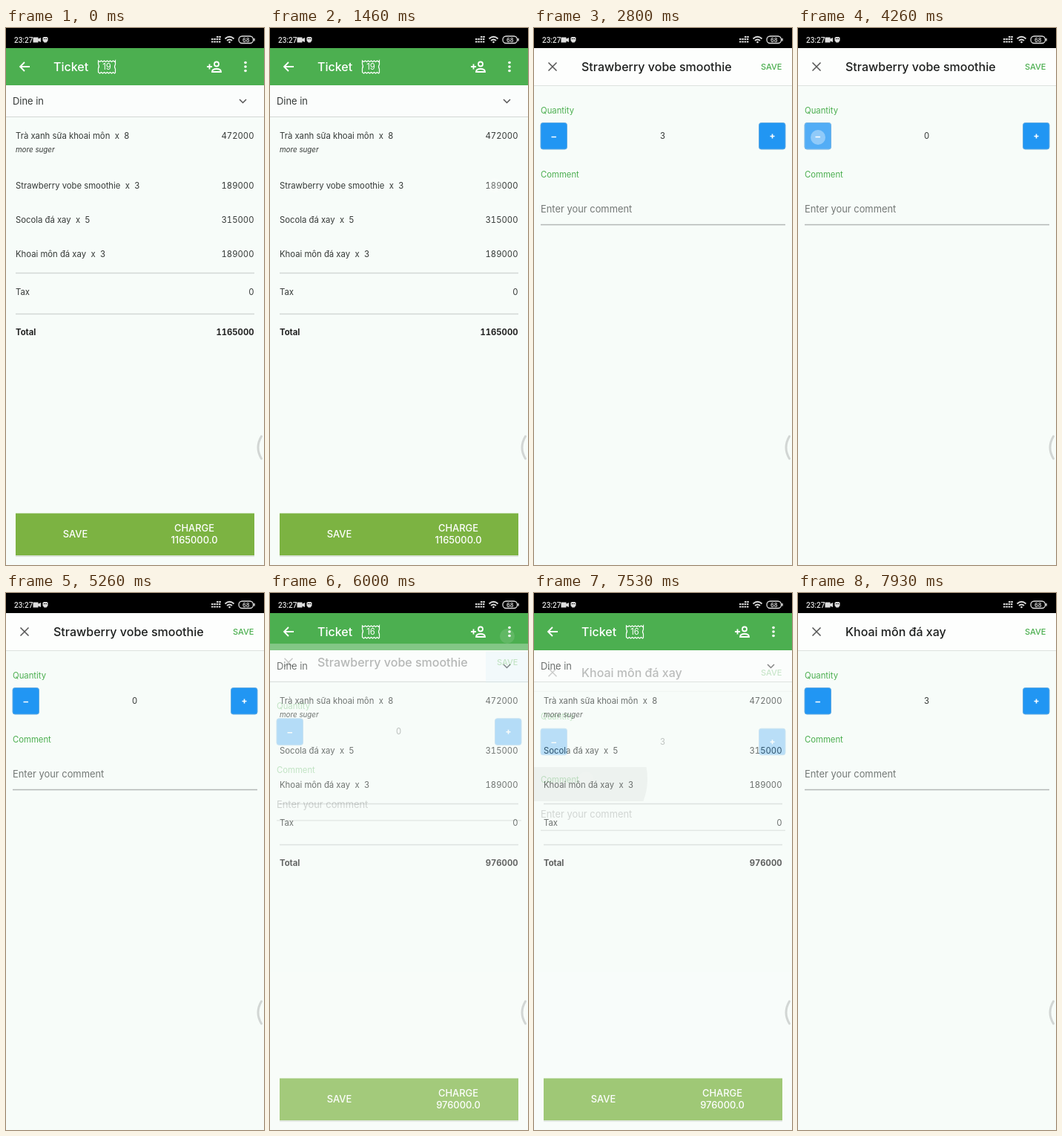
An HTML page that plays this animation: 348x722 px, repeating every 8000 ms.

```html
<!DOCTYPE html>
<html lang="vi">
<head>
<meta charset="utf-8">
<title>Ticket</title>
<style>
  html, body { margin: 0; width: 100%; height: 100%; overflow: hidden; background: #f7fcf9; }
  svg { display: block; width: 348px; height: 722px; }
  text { font: 11.3px Inter, Roboto, sans-serif; fill: #353937; white-space: pre; }
  .end { text-anchor: end; font-variant-numeric: tabular-nums; }
  .mid { text-anchor: middle; }
  .title { font-size: 16px; font-weight: 500; }
  .field { font-size: 12.9px; }
  .button { font-size: 12.9px; font-weight: 500; }
  .bold { font-weight: 700; fill: #222; }
  .note { font-size: 9.8px; font-style: italic; }
  .green { fill: #4caf50; }
  .white { fill: #fff; }
  .line { stroke: #d3d8d5; }
  .icon { fill: none; stroke: #fff; stroke-width: 1.8; }
  .stamp { stroke-width: 1.2; }
  .dark { stroke: #555; stroke-width: 1.5; }
  .step { fill: #2196f3; stroke: #62abe2; }
  .status text { fill: #ddd; }
</style>
</head>
<body>
<svg viewBox="0 0 348 722">
  <defs><clipPath id="rowClip"><rect id="rowArea" width="348" height="46"/></clipPath></defs>
  <rect width="348" height="722" fill="#f7fcf9"/>

  <g id="ticket">
    <rect y="77" width="348" height="42.5" fill="#fbfdfc"/>
    <rect y="27" width="348" height="50" fill="#4caf50"/>
    <path class="icon" d="M32 52H19M25 46L19 52L25 58"/>
    <text class="title white" x="64" y="57.8">Ticket</text>
    <path class="icon stamp"
      d="M124.500 44l2 1.500 2-1.500 2 1.500 2-1.500 2 1.500 2-1.500 2 1.500 2-1.500 2 1.500 2-1.500 2 1.500 1-1.500v5q-2 3 0 6v5l-1 1-2-1.500-2 1.500-2-1.500-2 1.500-2-1.500-2 1.500-2-1.500-2 1.500-2-1.500-2 1.500-2-1.500v-5q2-3 0-6z"/>
    <text id="count" class="mid white" x="136" y="56.2" font-weight="500"></text>
    <g class="icon">
      <path d="M271 52h7M274.500 48.500v7"/>
      <circle cx="284" cy="48.500" r="3"/>
      <path d="M278 59q0-4 6-4t6 4z"/>
    </g>
    <g class="white">
      <circle cx="323" cy="46.500" r="1.8"/><circle cx="323" cy="52" r="1.8"/><circle cx="323" cy="57.500" r="1.8"/>
    </g>
    <path class="line" d="M0 119.500H348"/>
    <text class="field" x="9" y="102.7">Dine in</text>
    <path class="icon dark" d="M315 96L319.500 100.500L324 96"/>
    <g clip-path="url(#rowClip)"><circle id="ripple" fill="#000" fill-opacity=".05"/></g>
    <g id="rows"></g>
    <text class="note" x="13" y="166.5">more suger</text>
    <g id="summary">
      <path class="line" stroke-width="1.4" d="M13 329.500H335M13 384.500H335"/>
      <text x="13" y="358.500">Tax</text><text class="end" x="334.500" y="358.500">0</text>
      <text class="bold" x="13" y="413">Total</text>
      <text id="total" class="bold end" x="334.500" y="413"></text>
    </g>
    <rect x="13" y="654" width="322" height="57" fill="#dbe2da"/>
    <rect x="13" y="652.500" width="322" height="56.500" fill="#7cb342"/>
    <text class="button mid white" x="93.500" y="685.3">SAVE</text>
    <text class="button mid white" x="254" y="677">CHARGE</text>
    <text id="charge" class="button mid white" x="254" y="693.3"></text>
  </g>

  <g id="detail">
    <rect y="27" width="348" height="722" fill="#f7fcf9"/>
    <rect y="27" width="348" height="50" fill="#fdfefd"/>
    <path class="line" stroke-opacity=".7" d="M0 77.500H348"/>
    <rect id="saveGlow" x="291" y="37" width="57" height="42" fill="#dff2fa"/>
    <path class="icon dark" d="M19.500 46.500L30.500 57.500M30.500 46.500L19.500 57.500"/>
    <text id="name" class="title" x="64" y="57.8" style="fill:#1d1f1e"></text>
    <text class="green end" x="334.500" y="56" style="font-size:11px;font-weight:500">SAVE</text>
    <text class="green" x="9" y="115">Quantity</text>
    <rect class="step" x="9" y="127.500" width="35.500" height="35.500" rx="3"/>
    <rect class="step" x="303.500" y="127.500" width="35.500" height="35.500" rx="3"/>
    <rect id="minusGlow" x="9" y="127.500" width="35.500" height="35.500" rx="3" fill="#fff" fill-opacity=".22"/>
    <path stroke="#fff" stroke-width="1.6" d="M23.500 146.500h6.500M318.500 145.500h6M321.500 142.500v6"/>
    <text id="quantity" class="mid" x="173.500" y="149"></text>
    <text class="green" x="9" y="200.7">Comment</text>
    <text class="field" x="9" y="247.7" style="fill:#747876">Enter your comment</text>
    <path stroke="#b4b8b6" stroke-width="1.3" d="M9 264.500H339"/>
  </g>

  <rect width="348" height="27"/>
  <g class="status" fill="#ddd">
    <text x="11" y="19.5" style="font:500 10px Roboto,sans-serif">23:27</text>
    <path d="M36.500 12.500h7v2l3.500-1.500v6l-3.500-1.500v2h-7zM49.500 13l1.500-1h4l1.500 1v4l-2 2.500h-3l-2-2.500z"/>
    <path d="M51 14.500h1.500M53.500 14.500h1.500" stroke="#000"/>
    <path d="M277 18.500H290M277 15H290M284 12H290" stroke="#ddd" stroke-width="2" stroke-dasharray="2.500 .8"/>
    <path d="M295.500 14.500q6-5.500 12 0M298 17q3.500-3 7 0" fill="none" stroke="#ddd" stroke-width="1.8"/>
    <circle cx="301.500" cy="19" r="1.3"/>
    <rect x="314" y="11" width="19.500" height="9.500" rx="4.500" fill="none" stroke="#ddd" stroke-width="1.3"/>
    <path d="M335 14v3.500" stroke="#ddd" stroke-width="1.5"/>
    <text class="mid" x="323.700" y="18.6" style="font-size:7.5px;font-weight:600">68</text>
  </g>
  <path d="M344.500 549Q335.500 564 344.500 579" fill="none" stroke="#d2d6d4" stroke-width="3" stroke-linecap="round"/>
  <circle id="touch" r="10" fill="#fff"/>
</svg>

<script>
const LOOP = 8000, OPEN_MS = 350, CLOSE_MS = 250;
const OPENINGS = [1480, 7515], CLOSING = 5790;
const MINUS_TAPS = [3050, 3590, 4130];
const items = [
  { name: "Trà xanh sữa khoai môn", count: 8, price: 472000, y: 149 },
  { name: "Strawberry vobe smoothie", count: 3, price: 189000, y: 216 },
  { name: "Socola đá xay", count: 5, price: 315000, y: 262 },
  { name: "Khoai môn đá xay", count: 3, price: 189000, y: 308 },
];
const touches = [
  { at: 1430, hold: 0, x: 303, y: 212, row: 189 },
  ...MINUS_TAPS.map(at => ({ at, hold: 140, x: 27, y: 147 })),
  { at: 5680, hold: 220, x: 320, y: 58 },
  { at: 7430, hold: 0, x: 70, y: 250, row: 234 },
];
const el = id => document.getElementById(id);
const set = (id, attrs) => Object.entries(attrs).forEach(([key, value]) => el(id).setAttribute(key, value));
const show = (id, visible) => set(id, { visibility: visible ? "visible" : "hidden" });
const clamp = v => Math.min(1, Math.max(0, v));

function drawTicket(removed) {
  const list = removed ? items.filter((_, i) => i !== 1) : items;
  const sum = key => list.reduce((n, item) => n + item[key], 0);
  el("rows").innerHTML = list.map((item, i) => {
    const y = item.y - (removed && i ? 46 : 0);
    return `<text x="13" y="${y}">${item.name}  x  ${item.count}</text>
      <text class="end" x="334.500" y="${y}">${item.price}</text>`;
  }).join("");
  set("summary", { transform: `translate(0 ${removed ? -46 : 0})` });
  el("count").textContent = sum("count");
  el("total").textContent = sum("price");
  el("charge").textContent = sum("price") + ".0";
}

// Page rises while fading in, and sinks while fading out.
function detailPose(t) {
  const closing = clamp((t - CLOSING) / CLOSE_MS);
  if (t >= CLOSING && t < OPENINGS[1])
    return { y: 58 * closing ** 2, alpha: 1 - closing ** 2.2 };
  const elapsed = t - OPENINGS[t < CLOSING ? 0 : 1];
  return {
    y: 63 * (1 - clamp(elapsed / OPEN_MS)) ** 3,
    alpha: 1 - (1 - clamp(elapsed / 200)) ** 4,
  };
}

let wasRemoved;
function render(t) {
  const removed = t >= CLOSING;
  if (removed !== wasRemoved) drawTicket(wasRemoved = removed);

  const pose = detailPose(t), second = t >= OPENINGS[1];
  set("detail", { transform: `translate(0 ${pose.y})`, opacity: pose.alpha });
  el("name").textContent = items[second ? 3 : 1].name;
  el("quantity").textContent = second ? 3 : 3 - MINUS_TAPS.filter(at => t >= at + 100).length;
  show("minusGlow", MINUS_TAPS.some(at => t >= at && t < at + 200));
  show("saveGlow", t >= 5680 && !second);

  const touch = touches.filter(p => t >= p.at).pop();
  show("touch", touch);
  show("ripple", touch && touch.row);
  if (touch) {
    const age = t - touch.at;
    set("touch", { cx: touch.x, cy: touch.y, opacity: 0.36 * (1 - clamp((age - touch.hold) / 150)) });
    if (touch.row) {
      set("rowArea", { y: touch.row });
      set("ripple", { cx: touch.x, cy: touch.y, r: Math.max(0, age - 30) * 1.17 });
    }
  }
}

const start = performance.now();
function tick() {
  render((performance.now() - start) % LOOP);
  requestAnimationFrame(tick);
}
tick();
</script>
</body>
</html>
```
